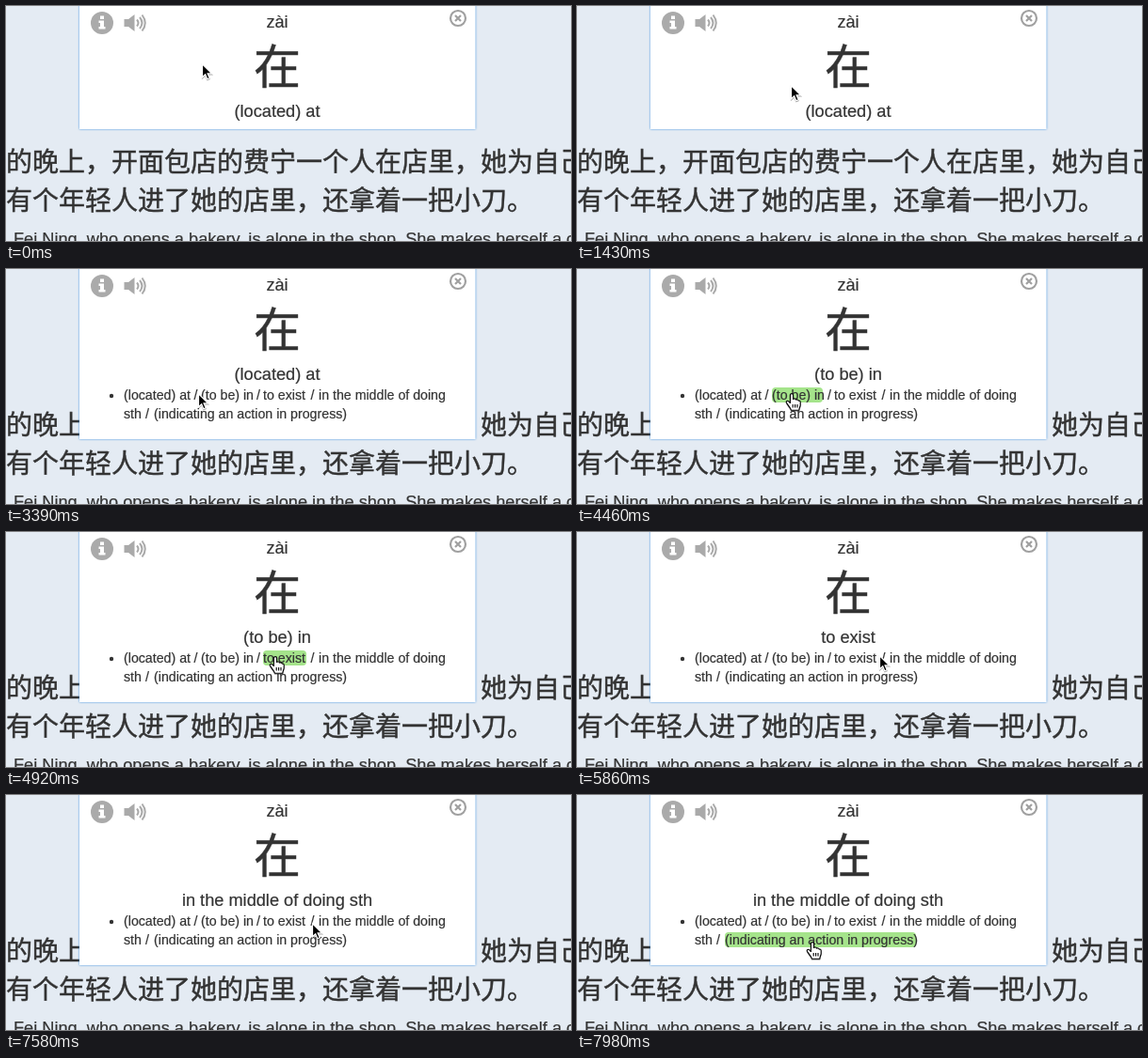
An HTML page for the animation above (8 s loop, 600x250 px).

```html
<!DOCTYPE html>
<html lang="zh-CN">
<head>
<meta charset="utf-8">
<title>Dictionary popup</title>
<style>
  html, body { margin: 0; width: 100%; height: 100%; overflow: hidden; background: #e4ebf3; }
  svg { display: block; }
  text { font-family: "Liberation Sans", Arial, sans-serif; font-size: 18.2px; fill: #333; stroke: #333; stroke-width: .2px; white-space: pre; }
  .han { font-family: "Noto Sans CJK SC", "Noto Sans CJK", sans-serif; font-size: 28px; stroke-width: .45px; }
  .big { font-size: 50px; }
  .mid { text-anchor: middle; }
  #card { fill: #fff; filter: drop-shadow(.6px .8px 1.2px #3a8fe0); }
  #meanings text { font-size: 14.2px; }
  #marks path { fill: #a5e48b; }
  #cursor { filter: drop-shadow(0 1px .7px rgba(0, 0, 0, .35)); }
</style>
</head>
<body>
<svg width="600" height="250" viewBox="0 0 600 250">
  <text class="han" x="0" y="175.7">的晚上，开面包店的费宁一个人在店里，她为自己</text>
  <text class="han" x="0" y="216.7">有个年轻人进了她的店里，还拿着一把小刀。</text>
  <text x="8" y="254">Fei Ning, who opens a bakery, is alone in the shop. She makes herself a cup</text>

  <rect id="card" x="78" y="-10" width="420.5"/>
  <g fill="#aaa">
    <circle cx="102" cy="18" r="12"/>
    <path fill="#fff" d="M100 10.5h4v3.5h-4zM98.5 15.5h5.5v6.5h1.5v2.5h-7v-2.5h1.5v-4h-1.5z"/>
    <path d="M125.500 14h4.500l6.500-5v18l-6.500-5h-4.500z"/>
    <g fill="none" stroke="#aaa" stroke-width="2">
      <path d="M139 14.500q3 3.500 0 7M142 12q5 6 0 12M144.500 9.500q6.500 8.500 0 17"/>
      <g stroke="#a0a0a0" stroke-width="2.200">
        <circle cx="480" cy="13" r="8"/>
        <path d="M477 10l6 6m0-6l-6 6"/>
      </g>
    </g>
  </g>
  <text class="mid" x="288" y="23">zài</text>
  <text class="han big mid" x="288" y="83.4">在</text>
  <text class="mid" id="chosen" x="288" y="118"></text>

  <g id="meanings">
    <g id="marks"></g>
    <circle cx="112" cy="135" r="2.200" fill="#333"/>
  </g>

  <g id="cursor">
    <path id="arrow" d="M.5.8V14.800L3.700 11.800L5.800 16.700L8.200 15.700L6.100 10.900H10.600Z" stroke="#fff" stroke-width="1.200"/>
    <g id="hand" fill="#fff" stroke="#000" stroke-width="1.100" stroke-linejoin="round">
      <path d="M-1.600 10.500V2C-1.600.2 1.600.2 1.600 2V6.500C2.200 5.600 4.400 5.800 4.600 7.200C5.400 6.500 7 7 7.200 8.200C8 7.700 9.200 8.200 9.200 9.500V12.500C9.200 14.500 8 15.500 7.800 18.200H-.6C-1 16-3 14.500-4 12.600L-5.600 10.200C-6.400 8.600-4.400 7.600-3.200 8.800Z"/>
      <path d="M1.200 12v3.500m2.400-3.500v3.500m2.400-3.500v3.500" fill="none"/>
    </g>
  </g>
</svg>
<script>
const LOOP = 8000, OPEN_AT = 1590, LINE_1 = 126, LINE_2 = 146;
const $ = id => document.getElementById(id);

function add(parent, tag, attrs, content = '') {
  const node = document.createElementNS('http://www.w3.org/2000/svg', tag);
  for (const key in attrs) node.setAttribute(key, attrs[key]);
  node.textContent = content;
  return parent.appendChild(node);
}

// Rounded bar with separate radii for its left and right ends
const bar = (x, y, w, l, r) =>
  `M${x + l} ${y}h${w - l - r}q${r} 0 ${r} ${r}v${16 - 2 * r}q0 ${r} ${-r} ${r}` +
  `h${l + r - w}q${-l} 0 ${-l} ${-l}v${2 * l - 16}q0 ${-l} ${l} ${-l}z`;

// Each phrase is a list of pieces: [text, x, y, width, left radius, right radius]
const phrases = [
  [['(located) at', 125, LINE_1, 72, 4, 4]],
  [['(to be) in', 207, LINE_1, 54, 4, 4]],
  [['to exist', 273, LINE_1, 46, 4, 4]],
  [['in the middle of doing', 332, LINE_1, 136, 4, 0], ['sth', 125, LINE_2, 19, 0, 4]],
  [['(indicating an action in progress)', 157, LINE_2, 203, 4, 4]],
].map(pieces => ({
  mark: add($('marks'), 'path', {
    d: pieces.map(([, x, y, w, l, r]) => bar(x, y, w, l, r)).join('')
  }),
  boxes: pieces.map(([label, x, y, w]) => {
    add($('meanings'), 'text', { x, y: y + 13 }, label);
    return [x, y, w, 16];
  }),
}));
for (const [x, y] of [[199.5, LINE_1], [266, LINE_1], [323.5, LINE_1], [148, LINE_2]])
  add($('meanings'), 'text', { x, y: y + 13 }, '/');

// Cursor moves: [first step, last step, number of steps, x, y]
const start = [208, 61];
const moves = [
  [660, 890, 5, 213.5, 69],
  [1250, 1760, 10, 253, 111.5],
  [2180, 2630, 9, 173, 131],
  [3170, 3620, 9, 226, 132],
  [4460, 4920, 9, 286, 132],
  [5630, 6090, 9, 346, 131],
  [7470, 7980, 10, 250, 155.5],
];
const choices = [
  [0, '(located) at'], [3980, '(to be) in'],
  [5150, 'to exist'], [6510, 'in the middle of doing sth'],
];

function cursorAt(t) {
  let [x, y] = start;
  for (const [from, to, steps, nextX, nextY] of moves) {
    if (t < from) break;
    // Steps fall on 10 ms ticks, so one may come a little before its even share
    const step = Math.floor((t - from) / (to - from) * (steps - 1) + .12) + 1;
    const u = Math.min(1, step / steps);
    const eased = u * u * (3 - 2 * u);
    x += (nextX - x) * eased;
    y += (nextY - y) * eased;
  }
  return [Math.round(x), Math.round(y)];
}

const inside = (px, py, [x, y, w, h]) => px >= x && px < x + w && py >= y && py < y + h;
const show = (node, on) => node.setAttribute('visibility', on ? 'visible' : 'hidden');

function draw(t) {
  const [x, y] = cursorAt(t);
  const open = t >= OPEN_AT;
  let pointing = inside(x, y, [243, 102, 90, 20]);

  for (const { mark, boxes } of phrases) {
    const hovered = open && boxes.some(box => inside(x, y, box));
    mark.style.display = hovered ? '' : 'none';
    pointing ||= hovered;
  }
  $('meanings').style.display = open ? '' : 'none';
  $('card').setAttribute('height', open ? 191 : 141);
  $('chosen').textContent = choices.filter(([from]) => t >= from).pop()[1];
  $('cursor').setAttribute('transform', `translate(${x} ${y})`);
  show($('hand'), pointing);
  show($('arrow'), !pointing);
}

const began = performance.now();
function tick() {
  draw((performance.now() - began) % LOOP);
  requestAnimationFrame(tick);
}
tick();
</script>
</body>
</html>
```
